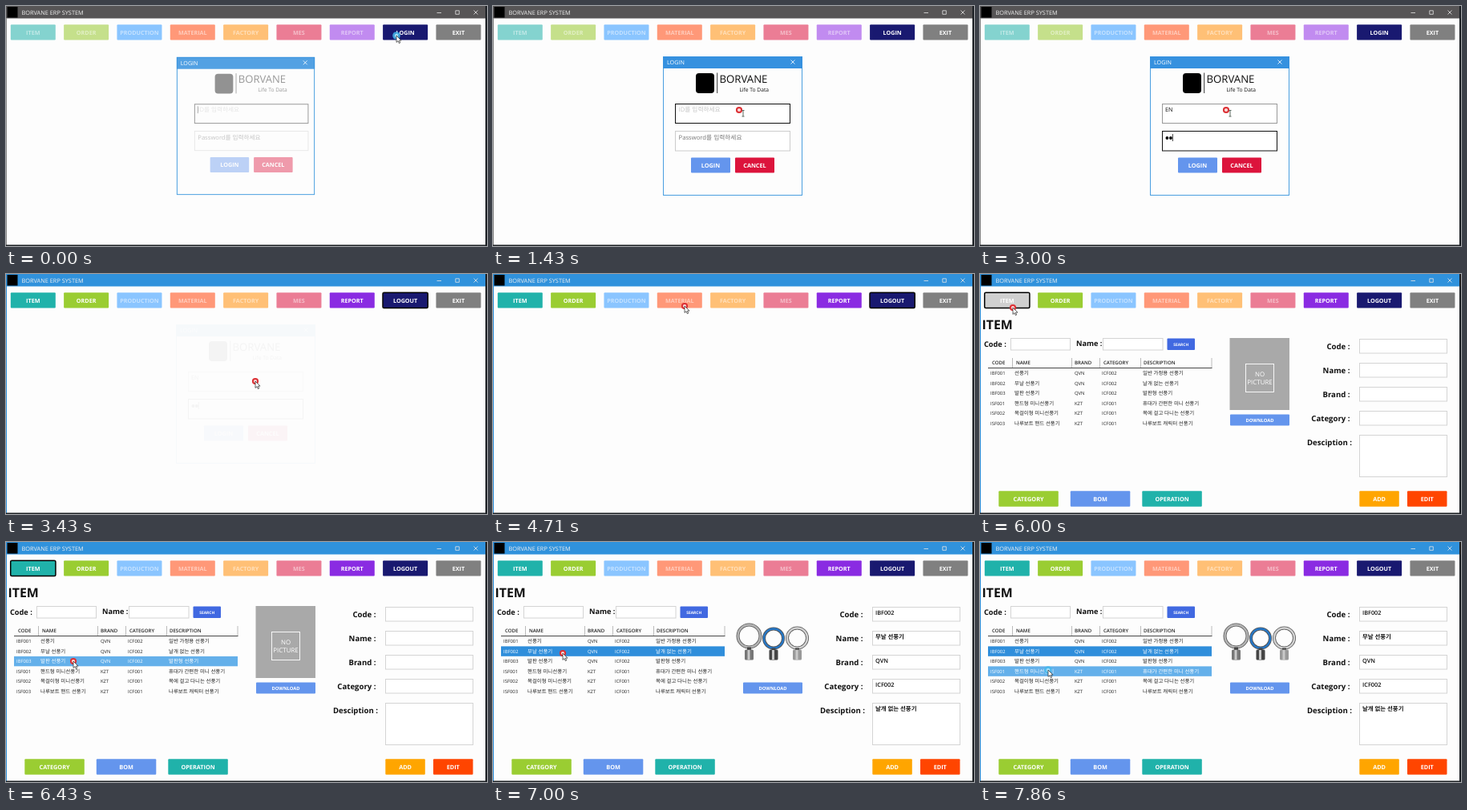
Animation of 600 by 300 pixels, one loop 8000 ms. Source, as an HTML page:

```html
<!DOCTYPE html>
<html lang="ko">
<head>
<meta charset="utf-8">
<title>ERP login demo</title>
<style>
html, body { margin: 0; width: 100%; height: 100%; overflow: hidden; background: #fdfdfd; }
svg { display: block; width: 600px; height: 300px; }
text {
  font-family: "Open Sans", "Noto Sans CJK KR", "Noto Sans CJK", sans-serif;
  text-rendering: geometricPrecision;
  white-space: pre;
}
.b { font-weight: 700; }
.s { font-weight: 600; }
.m { text-anchor: middle; }
.e { text-anchor: end; }
</style>
</head>
<body>
<svg id="stage" viewBox="0 0 600 300" xmlns="http://www.w3.org/2000/svg"></svg>
<script>
const LOOP = 8000;
const stage = document.getElementById('stage');
const $ = id => document.getElementById(id);

// Markup helpers
const rect = (x, y, w, h, fill, more = '') =>
  `<rect x="${x}" y="${y}" width="${w}" height="${h}" fill="${fill}" ${more}/>`;
const text = (x, y, size, str, fill = '#111', more = '') =>
  `<text x="${x}" y="${y}" font-size="${size}" fill="${fill}" ${more}>${str}</text>`;
const line = (d, color, w = 1) => `<path d="${d}" fill="none" stroke="${color}" stroke-width="${w}"/>`;
const box = (x, y, w, h, color = '#d4d4d4', more = '') =>
  rect(x + .5, y + .5, w - 1, h - 1, '#fff', `stroke="${color}" ${more}`);
const button = (x, y, w, h, fill, label, size = 7.3) =>
  rect(x, y, w, h, fill, 'rx="1"') +
  text(x + w / 2, y + h / 2 + size * .36, size, label, '#fff', 'class="b m"');
const group = (id, body, more = '') => `<g id="${id}" ${more}>${body}</g>`;
// Shown only inside the listed [from, to) pairs
const during = (times, body) => `<g data-on="${times}">${body}</g>`;

// Main window
const nav = [
  ['ITEM', '#84d3cf', '#20b2aa'], ['ORDER', '#c5e08b', '#9acd32'],
  ['PRODUCTION', '#8ac5ff'], ['MATERIAL', '#ff9878'], ['FACTORY', '#ffc076'],
  ['MES', '#eb7d95'], ['REPORT', '#c18bf0', '#8a2be2'],
  ['LOGIN', '#191970', '#191970'], ['EXIT', '#808080', '#808080']
];
const navX = i => 5.8 + i * 66.33;

const frame =
  rect(0, 0, 600, 300, '#fdfdfd') +
  rect(0, 0, 600, 15.5, '#575556', 'id="bar"') +
  rect(0, 15, 1, 284, '#8a8a8a', 'id="edge"') +
  rect(598, 0, 2, 300, '#1c2024') +
  rect(0, 298.5, 600, 1.5, '#1c2024') +
  rect(1.5, 1, 13, 13.5, '#000') +
  text(19.5, 11, 7.35, 'BORVANE ERP SYSTEM', '#f0f0f0') +
  line('M537.5 8.5H543M560.8 5.8H565.3V10.3H560.8ZM583.5 5.5L588.5 10.5M588.5 5.5L583.5 10.5', '#e6e6e6', .8);

const navBar = nav.map(([label], i) =>
  rect(navX(i), 23.3, 56, 19.2, '#fff', `id="n${i}" rx="1"`) +
  text(navX(i) + 28, 35.7, 7.2, label, '#fff', `id="l${i}" class="b m"`)).join('');

const focusRing = (i, times) => during(times,
  rect(navX(i) - .1, 23.2, 56.2, 19.4, 'none', 'rx="1.5" stroke="#000" stroke-width="1.5"'));

// Login dialog
const caret = (x, y) => line(`M${x} ${y}v9`, '#111', .8);
const login =
  rect(212.5, 63.5, 173, 173, '#fdfdfd', 'stroke="#4a9fe0"') +
  rect(212, 63, 174, 15, '#3691df', 'id="dlgBar"') +
  text(217, 73.2, 7.2, 'LOGIN', '#fff') +
  line('M371.5 67.5l5 5M376.5 67.5l-5 5', '#fff', .8) +
  group('dlgBody',
    rect(253, 84, 23, 25, '#000', 'rx="4"') +
    line('M279.7 83.5V109', '#222', .9) +
    text(282.5, 95.5, 13.2, 'BORVANE', '#111') +
    text(344, 106.5, 6.7, 'Life To Data', '#111', 'class="e"') +
    box(227, 122, 144, 25, '#111', 'id="idBox"') +
    box(227, 156, 144, 25.5, '#ccc', 'id="pwBox"') +
    during('0 1860', text(231.5, 132, 7.7, 'ID를 입력하세요', '#c4c4c4')) +
    during('0 140 1570 1860', caret(231.5, 125)) +
    during('1860 2140', text(231, 132, 7.3, 'E')) +
    during('2140 8000', text(231, 132, 7.3, 'EN')) +
    during('2000 2140', caret(236, 125)) +
    during('2290 2570', caret(242.5, 125)) +
    during('0 2710', text(231.5, 166.7, 7.7, 'Password를 입력하세요', '#777')) +
    during('2570 2710', caret(231.5, 160)) +
    during('2710 8000', '<circle cx="233.4" cy="165" r="1.9"/>') +
    during('3000 8000', '<circle cx="237.9" cy="165" r="1.9"/>' + caret(240.4, 160)) +
    button(247, 189.5, 49, 19, '#6495ed', 'LOGIN') +
    button(302, 189.5, 49, 19, '#dc143c', 'CANCEL'));

// Item page
const winged = 'IBF', hand = 'ISF';
const items = [
  [winged + '001', '선풍기', 'QVN', 'ICF002', '일반 가정용 선풍기'],
  [winged + '002', '무날 선풍기', 'QVN', 'ICF002', '날개 없는 선풍기'],
  [winged + '003', '발판 선풍기', 'QVN', 'ICF002', '발판형 선풍기'],
  [hand + '001', '핸드형 미니선풍기', 'KZT', 'ICF001', '휴대가 간편한 미니 선풍기'],
  [hand + '002', '목걸이형 미니선풍기', 'KZT', 'ICF001', '목에 걸고 다니는 선풍기'],
  [hand + '003', '나루보트 핸드 선풍기', 'KZT', 'ICF001', '나루보트 캐릭터 선풍기']
];
const colX = [13, 43, 118, 152, 203];
const colSize = [5.9, 6.45, 5.9, 5.9, 6.45];
const heads = [[15, 'CODE'], [45, 'NAME'], [118, 'BRAND'], [154, 'CATEGORY'], [204, 'DESCRIPTION']];

const table =
  heads.map(([x, s]) => text(x, 113.2, 6.1, s, '#222', 'class="s"')).join('') +
  line('M40.5 105v12M114.5 105v12M149.5 105v12M200.5 105v12M289 105v12', '#aaa', .8) +
  line('M10 117.5H289.5', '#333', .9) +
  items.map((item, r) => {
    const y = 117.9 + r * 12.5;
    return rect(10, y, 279, 12.4, 'none', `id="r${r}"`) + group('t' + r,
      item.map((s, c) => text(colX[c], y + 8.4, colSize[c], s, 'inherit')).join('')
        .replace(/fill="inherit"/g, ''));
  }).join('');

const fields = [['Code', 81], ['Name', 111], ['Brand', 141], ['Category', 171], ['Desciption', 201]];
const form = fields.map(([label, y], i) =>
  text(i == 4 ? 464 : 461.5, y + 13.2, 9.6, label + ' :', '#111', 'class="b e"') +
  box(473, y, 110, i == 4 ? 53 : 18.5) +
  during('7000 8000', text(477, y + 10, i % 2 || i == 4 ? 7.4 : 7.3, items[1][i], '#111', 'class="s"'))).join('');

const fan = (x, y, r, ring, body) =>
  `<circle cx="${x}" cy="${y}" r="${r}" fill="none" stroke="#555" stroke-width="4"/>` +
  `<circle cx="${x}" cy="${y}" r="${r}" fill="none" stroke="${ring}" stroke-width="2.4"/>` +
  rect(x - 2.5, y + r, 5, 5, '#444') +
  rect(x - 5.5, 134.5, 11, 13, body, 'rx="1.5"') +
  rect(x - 2, 135, 3, 12, '#c9c9c9');

const page =
  text(2.5, 69, 15.9, 'ITEM', '#111', 'class="b"') +
  text(5, 91.3, 9.2, 'Code :', '#111', 'class="b"') + box(38, 80, 75, 15.5) +
  text(120, 90.3, 9.2, 'Name :', '#111', 'class="b"') + box(153, 80, 75.5, 15.5) +
  button(233.5, 80.5, 34.5, 14.5, '#4169e1', 'SEARCH', 4.9) +
  table +
  during('0 7000',
    rect(311.5, 80, 74.5, 90, '#a9a9a9') +
    rect(331.5, 112.5, 35, 35, 'none', 'stroke="#fff" stroke-width=".9"') +
    text(349, 128, 7.9, 'NO', '#fff', 'class="m"') +
    text(349, 138, 7.9, 'PICTURE', '#fff', 'class="m"')) +
  during('7000 8000',
    fan(319.5, 117.5, 14, '#b5b5b5', '#777') +
    fan(350, 120.5, 12, '#2678c8', '#454545') +
    fan(379.5, 120, 12.5, '#d2d2d2', '#999')) +
  button(312, 175.5, 74, 14, '#6495ed', 'DOWNLOAD', 5.8) +
  form +
  button(23.3, 271.3, 74.5, 19.5, '#9acd32', 'CATEGORY') +
  button(112.8, 271.3, 74.5, 19.5, '#6495ed', 'BOM') +
  button(202.3, 271.3, 74.5, 19.5, '#20b2aa', 'OPERATION') +
  button(473.3, 271.3, 49.5, 19.5, '#ffa500', 'ADD') +
  button(533, 271.3, 49.5, 19.5, '#ff4500', 'EDIT');

// Pointer: red ring at rest, blue disc while clicking
const arrow = '<path d="M0 0V8.4L2 6.6L3.3 9.6L4.7 9L3.4 6.1H6Z" fill="#fff" stroke="#222" stroke-width=".7"/>';
const iBeam = line('M-1.5 -3.5H1.5M0 -3.5V4M-1.5 4H1.5', '#4c5a50', .9);
const redRing = '<circle r="3.1" fill="#fbdada" stroke="#dc3034" stroke-width="2"/>';
const blueDisc = '<circle r="4.8" fill="#45b8ec" fill-opacity=".85"/><circle r="2.2" fill="#a5def7"/>';
const pointer =
  during('0 290 5710 6000 6860 7000 7860 8000', blueDisc) +
  during('290 1000 3430 5710 6000 6860 7000 7860', redRing) +
  during('1000 3430', `<g transform="translate(-5 -4)">${redRing}</g>${iBeam}`) +
  during('0 1000 3430 8000', arrow);

stage.innerHTML = frame + navBar +
  focusRing(7, '3430 5710') + focusRing(0, '5710 6860') +
  during('6000 8000', page) + group('dlg', login) + group('ptr', pointer);

// Tracks: [time, value], each value holds until the next time
const path = [
  [0, 487, 37], [570, 474, 46], [710, 420, 78], [860, 350, 114], [1000, 307, 130],
  [1430, 312, 134], [3430, 311, 134], [3860, 309, 130], [4000, 302, 115], [4140, 290, 95],
  [4290, 276, 76], [4430, 262, 60], [4570, 250, 48], [4710, 239, 40], [4860, 228, 36],
  [5000, 165, 35], [5140, 100, 36], [5290, 55, 36], [5430, 38, 37], [6000, 41, 42],
  [6140, 52, 75], [6290, 72, 118], [6430, 84, 149], [6570, 86, 146], [6710, 87, 139],
  [7570, 86, 146], [7710, 85, 157], [7860, 85, 160]
];
const dialogIn = [[0, .42, 7.2, .99], [140, .68, 3.5, .995], [290, .88, 1.2, 1], [430, 1, 0, 1]];
const dialogOut = [[0, 1], [3290, .45], [3430, .03], [3570, 0]];
const navHover = [[0, -1], [5140, 1], [5290, 0], [6140, -1]];
const rowHover = [[0, -1], [6290, 0], [6430, 2], [6710, 1], [7570, 2], [7710, 3]];
const at = (track, t) => track.filter(k => k[0] <= t).pop();

const timed = [...document.querySelectorAll('[data-on]')]
  .map(el => [el, el.dataset.on.split(' ').map(Number)]);
const set = (id, name, value) => $(id).setAttribute(name, value);

function draw(t) {
  for (const [el, times] of timed) {
    const on = times.filter(k => k <= t).length % 2;
    el.style.display = on ? '' : 'none';
  }

  const active = t >= 3430;
  set('bar', 'fill', active ? '#3092dc' : '#575556');
  set('edge', 'fill', active ? '#3092dc' : '#8a8a8a');

  const hover = at(navHover, t)[1];
  nav.forEach(([, off, on], i) => {
    const lit = on && (active || i > 6);
    set('n' + i, 'fill', i == hover ? '#d0d0d0' : lit ? on : off);
    set('l' + i, 'fill-opacity', lit ? 1 : .5);
  });
  $('l7').textContent = active ? 'LOGOUT' : 'LOGIN';

  const [, alpha, shift, scale] = at(dialogIn, t);
  set('dlg', 'opacity', at(dialogOut, t)[1]);
  set('dlg', 'transform', `translate(299 150) scale(${scale}) translate(-299 -150)`);
  set('dlgBar', 'fill-opacity', .75 + alpha * .25);
  set('dlgBody', 'opacity', alpha);
  set('dlgBody', 'transform', `translate(${shift} 0)`);
  set('idBox', 'stroke', t < 2570 ? '#111' : '#999');
  set('pwBox', 'stroke', t < 2570 ? '#ccc' : '#111');

  const row = at(rowHover, t)[1];
  items.forEach((_, r) => {
    const picked = r == 1 && t >= 6860;
    set('r' + r, 'fill', picked ? '#2f8edb' : r == row ? '#64b0ea' : 'none');
    set('t' + r, 'fill', picked || r == row ? '#fff' : '#222');
  });

  const [, x, y] = at(path, t);
  set('ptr', 'transform', `translate(${x} ${y})`);
}

let start;
function tick(now) {
  start ??= now;
  draw((now - start) % LOOP);
  requestAnimationFrame(tick);
}
draw(0);
requestAnimationFrame(tick);
</script>
</body>
</html>
```
